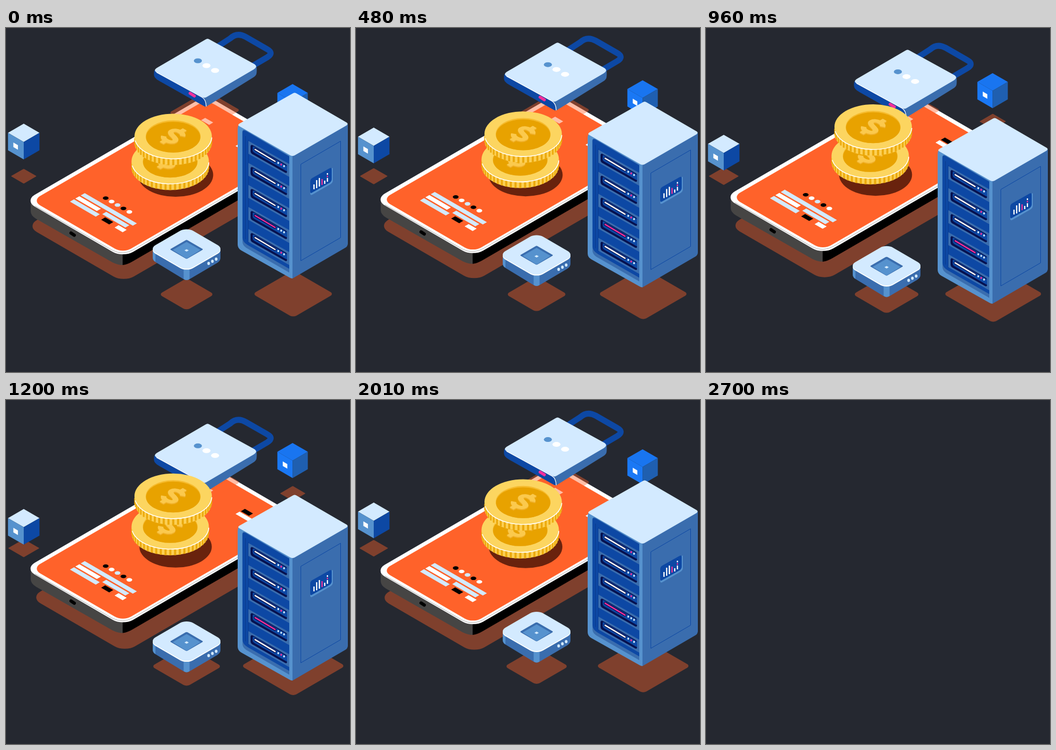
Recreate the animation shown at these times as an HTML page with a canvas. Size 640 by 640 pixels, loop 2.73 s.

```html
<!DOCTYPE html>
<html>
<head>
<meta charset="utf-8">
<style>
  html, body { margin: 0; width: 100%; height: 100%; overflow: hidden; background: #252830; }
  canvas { display: block; }
</style>
</head>
<body>
<canvas id="stage" width="640" height="640"></canvas>
<script>
const ctx = document.getElementById('stage').getContext('2d');
const LOOP = 2730, VISIBLE = 2700, SLOPE = 0.58;
const ICE = '#d3eaff', SKY = '#5692ce', STEEL = '#3a6dae', NAVY = '#0d48a4', INK = '#06114f';
const ORANGE = '#ff622a', PINK = '#f2309b', SHADOW = 'rgba(255,98,42,.41)';

const fill = (d, color) => { ctx.fillStyle = color; ctx.fill(new Path2D(d)); };
const line = (d, color, width, cap = 'butt') => {
  ctx.strokeStyle = color;
  ctx.lineWidth = width;
  ctx.lineCap = cap;
  ctx.lineJoin = 'round';
  ctx.stroke(new Path2D(d));
};
const ellipse = (x, y, rx, ry, color) => {
  ctx.beginPath();
  ctx.ellipse(x, y, rx, ry, 0, 0, 7);
  ctx.fillStyle = color;
  ctx.fill();
};
const at = (x, y, draw) => { ctx.save(); ctx.translate(x, y); draw(); ctx.restore(); };
const mix = (a, b, k) => a + (b - a) * k;

// Rounded rectangle on the ground plane, placed by its left corner
function tile(x, y, w, h, r, color) {
  ctx.save();
  ctx.transform(1, SLOPE, 1, -SLOPE, x, y);
  ctx.beginPath();
  ctx.roundRect(0, 0, w, h, r);
  ctx.restore();
  ctx.fillStyle = color;
  ctx.fill();
}

function diamond(cx, cy, halfWidth, r, color) {
  const half = halfWidth + 0.586 * r;
  tile(cx - half, cy, half, half, r, color);
}

// Rises 0 to 1 between start and peak, falls back until end
function ramp(t, start, peak, end) {
  const u = t < peak ? (t - start) / (peak - start) : (end - t) / (end - peak);
  return Math.min(1, Math.max(0, u));
}
const ease = u => (1 - Math.cos(Math.PI * u)) / 2;

function phone() {
  fill('M46 321V341Q46 349 56 355L198 436Q208 441 217 441L240 420 60 310Z', '#464544');
  fill('M217 415V441Q226 440 236 434L460 304V280Z', '#000');
  line('M121 381.5L127 385.5', '#000', 6, 'round');
  tile(34.5, 321.3, 183, 338, 19, '#fff');
  line('M54 331L198 413.5Q217 423.5 237 412.5L440 295', '#777', 0.6);
  tile(48.5, 321.3, 169, 324, 15, ORANGE);

  tile(139, 311.5, 97, 7.5, 0, ICE);
  tile(129, 317.3, 40, 7.5, 0, '#fff');
  tile(179, 346.3, 43, 7.5, 0, ICE);
  tile(119, 323.1, 48, 7.5, 0, ICE);
  tile(177, 356.7, 15, 7.5, 0, '#000');
  tile(202, 371.2, 15, 7.5, 0, '#fff');
  ['#000', '#fff', ICE, '#000', '#fff'].forEach((color, i) =>
    ellipse(185.5 + 11 * i, 316.5 + 6.4 * i, 5.3, 3.3, color));

  tile(363, 171.5, 15, 7.5, 0, '#fff');
  tile(437, 214.4, 15, 7.5, 0, '#000');
  tile(427, 219.5, 40, 7.5, 0, '#fff');
}

function lock() {
  line('M386 39.5L417 19.5Q430 7.5 446 16.5L486 39.5Q499 46.5 486 54.5L452 74.5', NAVY, 11);
  fill('M276 79Q274 88 277 92Q280 96 286 99L365 143.500Q370 147 373 146L380 120 290 72Z', NAVY);
  fill('M466 70Q467 80 466 85Q465 89 460 92L373 146Q373 135 366 128L440 72Z', STEEL);
  fill('M371 21.5Q375 18.5 379 21.5L460 66Q470 71 461 77L374 128Q370 131 366 129L281 83Q273 79 281 74Z', ICE);
  line('M280 82.500L365 129Q372 133 372.500 146', '#fff', 1.3);
  ellipse(357, 61, 7.5, 4.5, SKY);
  ellipse(373, 70, 7.5, 4.5, '#fff');
  ellipse(389, 79, 7.5, 4.5, '#fff');
  line('M342.5 121.5L350.5 126.5', PINK, 5.5, 'round');
}

function dollar(color) {
  ctx.save();
  ctx.transform(0.866, 0.5, -0.866, 0.5, 0, 0);
  line('M10-10C6-18-11-17-11-8C-11 2 11-2 11 8C11 17-6 18-10 10M0-25V-13M0 13V25', color, 8.5);
  ctx.restore();
}

function coin() {
  const rx = 72, ry = 42, depth = 11.5;
  ctx.beginPath();
  ctx.ellipse(0, depth, rx, ry, 0, 0, Math.PI);
  ctx.lineTo(-rx, 0);
  ctx.ellipse(0, 0, rx, ry, 0, Math.PI, 0, true);
  ctx.fillStyle = '#fdd055';
  ctx.fill();
  for (let a = 0.08; a < 3.1; a += 0.124) {
    const x = rx * Math.cos(a), y = ry * Math.sin(a);
    line(`M${x} ${y}v${depth}`, '#eba90c', 1.2 + 2.8 * Math.sin(a));
  }
  ellipse(0, 0, rx, ry, '#fcd560');
  ctx.beginPath();
  ctx.ellipse(0, 0, rx, ry, 0, 0.05, 2.95);
  ctx.strokeStyle = '#fff';
  ctx.lineWidth = 1.6;
  ctx.stroke();
  ellipse(0, 0.3, 51, 30, '#f6bb2d');
  ellipse(0, 1.6, 50.5, 28.7, '#e8a200');
  at(0, 1.5, () => dollar('#f0b02a'));
  at(0, -0.5, () => dollar('#fbc94d'));
}

function router() {
  fill('M273 411V427Q273 433 279 436L330 467Q336 471 342 467L393 437Q399 433 399 428V411Z', STEEL);
  fill('M273 411V427Q273 432 278 435V415Z', SKY);
  fill('M330.5 440V467Q336 471 341.5 467V440Z', SKY);
  diamond(336, 413, 63, 12, '#fff');
  diamond(336, 411, 63, 12, ICE);
  diamond(336, 411.8, 30, 2, STEEL);
  fill('M336 398L362 413 338 428Q336 429 334 428L310 413Z', SKY);
  diamond(336, 413.7, 4, 0, ICE);
  for (let i = 0; i < 3; i++) ellipse(377 + 7 * i, 438 - 4 * i, 2.5, 3, ICE);
}

function serverSlot(accent, lamp) {
  fill('M451 210L527 253V277L451 234Z', STEEL);
  fill('M455 221Q455 216 459 218L521 254Q523 255 523 258V267Q523 271 519 269L459 235Q455 233 455 229Z', INK);
  fill('M459 222Q459 219 462 221L523 257V267L462 232Q459 230 459 228Z', NAVY);
  line('M463.5 226L500.5 248', INK, 5, 'round');
  line('M463.5 226L500.5 248', accent, 2.6, 'round');
  ellipse(506.5, 251, 1.7, 2, ICE);
  ellipse(512, 254, 1.7, 2, lamp);
  ellipse(517.3, 257, 1.7, 2, ICE);
}

function server() {
  fill('M533 236L636 178V401Q636 406 631 409L533 466Z', STEEL);
  fill('M540 234L437 178Q431 180 431 188V403Q431 410 438 414L527 464Q530 466 533 466V238Z', SKY);
  fill('M433 182Q431 180 434 178L533 122Q537 119 541 122L634 176Q637 178 634 181L537 237Q533 239 529 237Z', ICE);
  fill('M439.5 194Q440 187 447 191L527 238V455L447 409Q440 404 440 398Z', STEEL);
  fill('M440 194Q440 188 447 192L527 239V448L450 404Q440 398 440 390Z', NAVY);
  line('M445.5 201V393', '#0a3a8c', 1);
  line('M451 208V400', '#0a3a8c', 1);
  for (let i = 0; i < 5; i++) {
    const hot = i === 3;
    at(0, 41 * i, () => serverSlot(hot ? PINK : '#fff', hot ? ICE : PINK));
  }

  line('M548.5 253.5L622.5 210.5V390L548.5 433Z', NAVY, 1);
  fill('M566 290L608 260V284Q608 288 603 291L570 310Q566 312 566 308Z', SKY);
  fill('M566 286Q566 281 570 279L602 261Q606 259 606 263V281Q606 285 602 288L570 306Q566 309 566 304Z', NAVY);
  line('M573 291V300M578 283V298M583 279V295M593 284V290M598 279V286M598 270V273', '#fff', 2.3);
  line('M588 281V292M598 274.5V277.5', PINK, 2.3);
}

function cube(w, top, left, right) {
  const h = w * SLOPE, side = 32.5;
  fill(`M0 0L${w} ${h}L0 ${2 * h}L${-w} ${h}Z`, top);
  fill(`M${-w} ${h}L0 ${2 * h}V${2 * h + side}L${-w} ${h + side}Z`, left);
  fill(`M${w} ${h}L0 ${2 * h}V${2 * h + side}L${w} ${h + side}Z`, right);
  fill(`M${10 - w} ${h + 18}l8.5 5v8.5l-8.5-5Z`, '#fff');
}

function draw(t) {
  ctx.fillStyle = '#252830';
  ctx.fillRect(0, 0, 640, 640);
  if (t >= VISIBLE) return;
  // Shadows scale linearly while the objects ease
  const grow = ramp(t, 0, 1350, VISIBLE);
  const k = ease(ramp(t, 0, 1340, 2690));
  const hop = ease(ramp(t, 120, 1420, 2590));

  const s = mix(0.988, 0.958, grow);
  tile(295.5 - 260.5 * s, 324 + 45 * s, 183 * s, 338 * s, 19, SHADOW);
  at(0, -7.7 * k, phone);
  tile(303.5, 157.5, 62, 70, 4, SHADOW);
  ellipse(315.5, 273.5 - grow * 0.7, mix(70, 67, grow), mix(40.5, 38.8, grow), '#69220d');
  at(0, 25 * k, lock);
  at(305.5, 248 - 12.8 * k, coin);
  at(311, 201.5 - 24.3 * hop, coin);

  diamond(33, 275.7, mix(23.3, 29.2, grow), 1, SHADOW);
  at(33, 178 + 25.3 * k, () => cube(29.3, ICE, SKY, NAVY));
  diamond(533.5, 173.8, mix(28, 22.6, grow), 1, SHADOW);
  at(533.2, 104.3 - 25 * k, () => cube(28.3, '#1975f0', '#1a78f5', '#1f5fb0'));

  diamond(336, 495.5, mix(48, 63.7, grow), 6, SHADOW);
  at(0, 38.5 * k, router);
  diamond(534.3, 494.8, mix(72, 96, grow), 6, SHADOW);
  at(0, 57.5 * k, server);
}

const begin = performance.now();
function frame() {
  draw((performance.now() - begin) % LOOP);
  requestAnimationFrame(frame);
}
frame();
</script>
</body>
</html>
```
